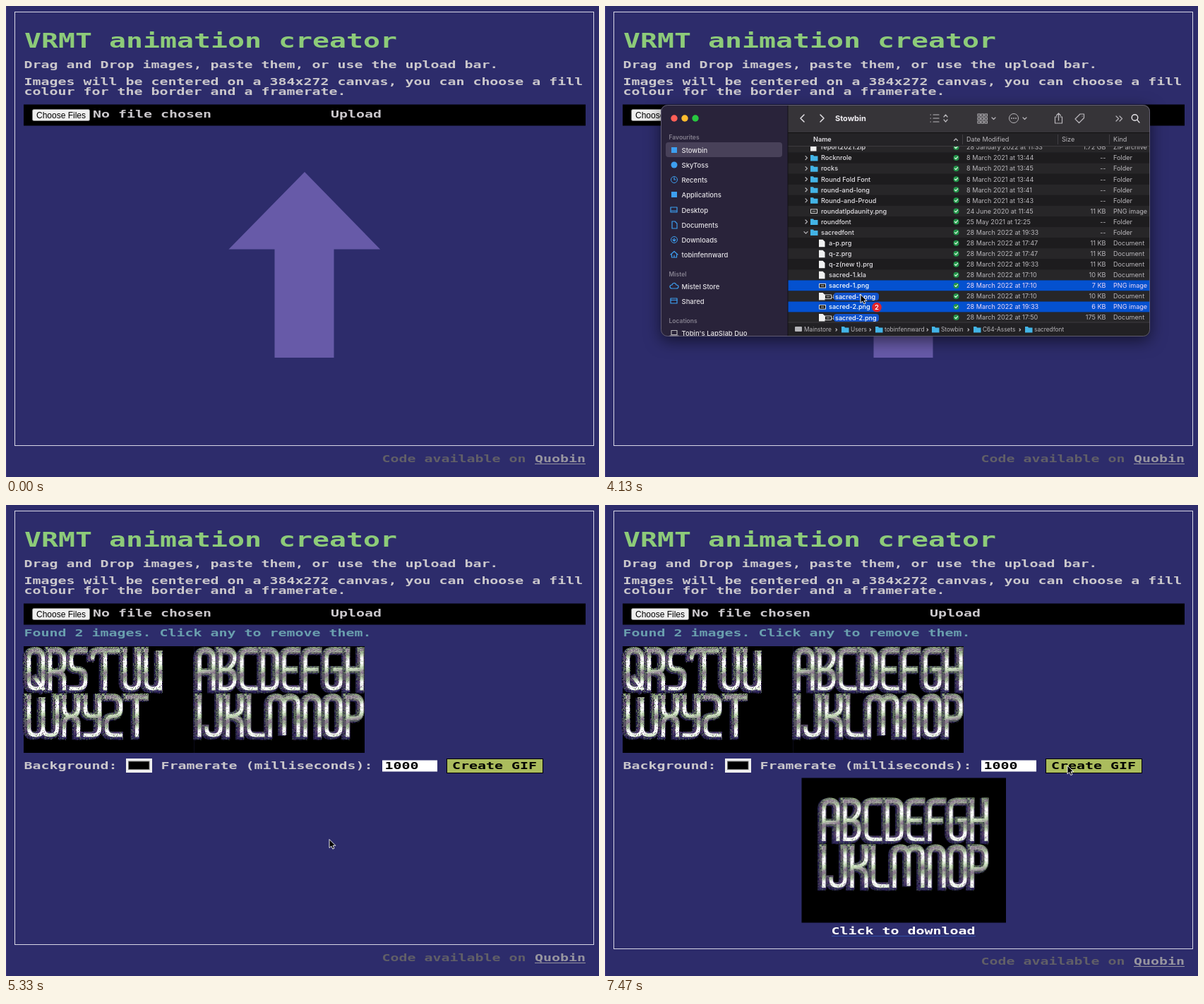
An HTML page for the animation above (8 s loop, 840x667 px).

```html
<!DOCTYPE html>
<html lang="en">
<head>
<meta charset="utf-8">
<title>Animation creator</title>
<style>
html, body { margin: 0; width: 100%; height: 100%; overflow: hidden; background: #2d2c6b; }
svg { display: block; }
text { font-family: Inter, sans-serif; white-space: pre; }
.wide { font-family: "DejaVu Sans Mono", monospace; font-weight: bold; }
.button { font: 12px "Liberation Sans", sans-serif; }
.line { fill: none; stroke-width: 1.2; stroke-linecap: round; stroke-linejoin: round; }
#finder { filter: drop-shadow(0 6px 11px rgba(0,0,0,.55)); }
</style>
</head>
<body>
<svg id="stage" width="840" height="667" viewBox="0 0 840 667"></svg>
<script>
const rect = (x, y, w, h, fill, extra = '') =>
  `<rect x="${x}" y="${y}" width="${w}" height="${h}" fill="${fill}" ${extra}/>`;
const disc = (x, y, r, fill, extra = '') => `<circle cx="${x}" cy="${y}" r="${r}" fill="${fill}" ${extra}/>`;
const line = (d, stroke, extra = '') => `<path class="line" d="${d}" stroke="${stroke}" ${extra}/>`;
const text = (x, y, str, size, fill, extra = '') =>
  `<text x="${x}" y="${y}" font-size="${size}" fill="${fill}" ${extra}>${str}</text>`;

// Wide monospaced face: one cell is 12 px at size 14
const wide = (x, y, str, fill = '#cbc8cc', size = 14, extra = '') =>
  `<text class="wide" transform="translate(${x} ${y}) scale(1.424 1)" font-size="${size}" fill="${fill}" ${extra}>${str}</text>`;

let seed = 7;
const random = () => (seed = seed * 16807 % 2147483647) / 2147483647;

// ---- Ornamental alphabet ----
const arch = 'M0 54V10Q0 0 10 0T20 10V54';
const ring = 'M0 10V44Q0 54 10 54T20 44V10Q20 0 10 0T0 10';
const flag = 'M0 54V0H10Q20 0 20 10V20Q20 30 10 30H0';
const hook = 'M20 0H10Q0 0 0 10V';
const cup = 'M0 0V44Q0 54 10 54T20 44V0';
const glyphs = {
  A: arch + 'M0 30H20',
  B: 'M0 0H10Q20 0 20 10T10 27H0M10 27Q20 27 20 40T10 54H0V0',
  C: hook + '44Q0 54 10 54H20',
  D: 'M0 54V0H10Q20 0 20 10V44Q20 54 10 54H0',
  E: hook + '44Q0 54 10 54H20M0 27H16',
  F: hook + '54M0 27H16',
  G: hook + '44Q0 54 10 54T20 44V27H12',
  H: 'M0 0V54M20 0V54M0 27H20',
  I: 'M0 0V54',
  J: 'M20 0V44Q20 54 10 54T0 44',
  K: 'M0 0V54M20 0V14Q20 27 0 27Q20 27 20 40V54',
  L: 'M0 0V44Q0 54 10 54H20',
  M: arch + 'V10Q20 0 30 0T40 10V54',
  N: arch,
  O: ring,
  P: flag,
  Q: ring + 'M10 40L20 54',
  R: flag + 'M8 30Q20 30 20 42V54',
  S: hook + '17Q0 27 10 27T20 37V44Q20 54 10 54H0',
  T: 'M0 10Q0 0 10 0H36M18 0V54',
  U: cup,
  V: cup + 'V54',
  W: cup + 'V44Q20 54 30 54T40 44V0',
  X: 'M0 0V14Q0 27 10 27T20 40V54M20 0V14Q20 27 10 27T0 40V54',
  Y: 'M0 0V17Q0 27 10 27H20M20 0V44Q20 54 10 54H0',
  Z: 'M0 0H10Q20 0 20 10V17Q20 27 10 27T0 37V44Q0 54 10 54H20',
  t: 'M0 0H26M13 0V54'
};
const widths = { I: 0, M: 40, W: 40, T: 36, t: 26 };

function artRow(id, letters, y) {
  let x = 0;
  const paths = [...letters].map(c => {
    const p = `<path transform="translate(${x} 0)" d="${glyphs[c]}"/>`;
    x += (widths[c] ?? 20) + 10;
    return p;
  }).join('');
  const layer = (stroke, w, dx, dy) =>
    `<use href="#${id}" x="${dx}" y="${dy}" stroke="${stroke}" stroke-width="${w}"/>`;
  return `<g transform="translate(6 ${y + 6})" fill="none" stroke-linecap="square">
    <defs><g id="${id}">${paths}</g></defs>
    ${layer('#1e1a40', 11, -2, 1)}${layer('url(#side)', 10, 0, 0)}
    ${layer('url(#specks)', 12, -1, 1)}${layer('url(#core)', 5, 1.5, 0)}${layer('url(#dust)', 6, 1, 0)}</g>`;
}
const art = (id, top, bottom) => `<g id="${id}">${rect(0, 0, 241.5, 151, '#000')}
  ${artRow(id + 1, top, 0)}${artRow(id + 2, bottom, 66)}</g>`;

const specks = (count, colors) => Array.from({ length: count }, () =>
  rect(Math.floor(random() * 48), Math.floor(random() * 60), 1, 1, colors[Math.floor(random() * colors.length)])).join('');
const pattern = (id, content) =>
  `<pattern id="${id}" width="48" height="60" patternUnits="userSpaceOnUse">${content}</pattern>`;
const gradient = (id, x1, y1, x2, y2, colors) =>
  `<linearGradient id="${id}" gradientUnits="userSpaceOnUse" spreadMethod="repeat" x1="${x1}" y1="${y1}" x2="${x2}" y2="${y2}">${
    colors.map((c, i) => `<stop offset="${i / (colors.length - 1)}" stop-color="${c}"/>`).join('')}</linearGradient>`;

const defs = `<defs>
  ${pattern('specks', specks(1100, ['#0c0a1c', '#2f2963', '#5c4468', '#5f7a55']))}
  ${pattern('dust', specks(420, ['#8fae7f', '#6b5475', '#cfd6c9']))}
  ${gradient('side', 0, -6, 0, 60, ['#93b37c', '#654a72', '#5d7857', '#564168', '#2d2660'])}
  ${gradient('core', 0, -6, 6, 27, ['#c5dcb6', '#8b7590', '#a3bd94', '#fff', '#fff', '#c5dcb6'])}
  ${art('late', 'QRSTUV', 'WXYZt')}${art('early', 'ABCDEFGH', 'IJKLMNOP')}
  <clipPath id="rows"><rect x="259" y="199" width="513" height="249"/></clipPath>
  <clipPath id="pane"><rect x="79" y="140" width="693" height="328" rx="9"/></clipPath>
</defs>`;

// ---- Page ----
const page = rect(0, 0, 840, 667, '#2d2c6b') + rect(0, 0, 1, 667, '#403880') +
  rect(12.5, 8.5, 820, 614, 'none', 'id="frame" stroke="#d8d7e6"') +
  wide(26, 59, 'VRMT animation creator', '#8dcb79', 28) +
  wide(25.5, 88, 'Drag and Drop images, paste them, or use the upload bar.') +
  wide(25.5, 112, 'Images will be centered on a 384x272 canvas, you can choose a fill') +
  wide(25.5, 126, 'colour for the border and a framerate.') +
  rect(25, 139.5, 796, 30, '#000') +
  rect(37.5, 146.5, 81, 16, '#efefef', 'rx="2" stroke="#858585"') +
  `<text class="button" x="43" y="158.5">Choose Files</text>` +
  wide(123, 158, 'No file chosen') + wide(460, 158, 'Upload') +
  `<g id="footer">${wide(532.5, 646, 'Code available on', '#615f67')}
    ${wide(749, 646, 'Quobin', '#97959f')}${rect(749, 648, 72, 1, '#97959f')}</g>`;

const arrow = '<path id="arrow" d="M423 235L530 344.500H464.500V498H380.500V344.500H315.500Z" fill="#675aa8"/>';

const results = `<g id="results">
  ${wide(25.5, 186, 'Found 2 images. Click any to remove them.', '#6a9fae')}
  <use href="#late" x="25" y="200"/><use href="#early" x="266.500" y="200"/>
  ${wide(25.5, 374, 'Background:')}
  ${rect(170, 359, 37, 20, '#efefef')}${rect(173.5, 363, 29.5, 11.5, '#000', 'stroke="#777"')}
  ${wide(219.5, 374, 'Framerate (milliseconds):')}
  ${rect(533, 361.5, 78, 16, '#fff')}${wide(536.5, 374, '1000', '#000')}
  ${rect(624.5, 359.5, 136, 20, '#abbc5d', 'stroke="#000"')}${wide(632, 374, 'Create GIF', '#000')}
</g>`;

const preview = `<g id="preview">${rect(278.5, 386.5, 289.5, 205, '#000')}
  <use id="previewLate" href="#late" x="302.500" y="413.500"/>
  <use id="previewEarly" href="#early" x="302.500" y="413.500"/>
  ${wide(320.5, 608, 'Click to download', '#fff')}${rect(321, 610, 204, 1, '#304fa8')}</g>`;

// ---- File window ----
const BLUE = '#3d9ff0', PALE = '#e4e2e6', GREY = '#b9b7bb';
const folder = (x, y) => `<path d="M${x} ${y - 4}h4l1 1.500h5.500v7h-10.500z" fill="#43b4e6"/>`;
const paper = (x, y) => `<path d="M${x} ${y - 5}h5.500l3 3v7.500h-8.500z" fill="#f1f1f1"/>`;
const picture = (x, y) => rect(x + .5, y - 2.5, 9, 5.5, '#111', 'stroke="#ddd"') + rect(x + 2.5, y - .5, 5, 1.5, '#999');
const chevron = (x, y, r = 2.5) => line(`M${x} ${y - r}l${r} ${r}l${-r} ${r}`, GREY);

// depth | name | date | size | kind
const M21 = '8 March 2021 at 13:', M22 = '28 March 2022 at 1';
const files = [
  '0|report2021.zip|28 January 2022 at 11:33|1.72 GB|ZIP archive',
  `0|Rocknrole|${M21}44`, `0|rocks|${M21}45`, `0|Round Fold Font|${M21}44`,
  `0|round-and-long|${M21}41`, `0|Round-and-Proud|${M21}43`,
  '0|roundatlpdaunity.png|24 June 2020 at 11:45|11 KB|PNG image',
  '0|roundfont|25 May 2021 at 12:25', `0|sacredfont|${M22}9:33`,
  `1|a-p.prg|${M22}7:47|11 KB`, `1|q-z.prg|${M22}7:47|11 KB`, `1|q-z(new t).prg|${M22}9:33|11 KB`,
  `1|sacred-1.kla|${M22}7:10|10 KB`, `1|sacred-1.png|${M22}7:10|7 KB|PNG image`,
  `1|sacred-2.kla|${M22}7:10|10 KB`, `1|sacred-2.png|${M22}9:33|6 KB|PNG image`,
  `1|sacredfont.d64|${M22}7:50|175 KB`
];

function fileRow(entry, i) {
  const [depth, name, date, size, kind = size ? 'Document' : 'Folder'] = entry.split('|');
  const y = 200 + i * 15.07, x = 291 + depth * 12, base = y + 3.3;
  const picked = /^sacred-\d\.png$/.test(name);
  const soft = picked ? '#f0d9f7' : GREY;
  const icon = !size ? folder : kind == 'PNG image' ? picture : paper;
  const twist = size ? '' : name == 'sacredfont' ? line(`M282 ${y - 1}l2.500 2.500l2.500 -2.500`, GREY) : chevron(284, y);
  return rect(259, y - 7.5, 513, 15.1, picked ? '#0451cf' : i % 2 ? '#1d1c1e' : '#272628') +
    twist + icon(x, y) +
    text(depth == 1 ? 317 : 306, base, name, 9.1, picked ? '#fff' : PALE, 'font-weight="500"') +
    disc(497.5, y, 4, '#23954a') + line(`M495.500 ${y}l1.500 1.500l2.500 -3`, '#dff5e4') +
    text(512, base, date, 9.1, soft) +
    text(709.5, base, size || '--', 9.1, soft, 'text-anchor="end"') + text(720, base, kind, 9.1, soft);
}

const USER = 'tobinfennward', STORE = 'Stowbin';
const box = y => line(`M93 ${y - 4}h9v7h-9z`, BLUE);
const sideItems = [
  [204, STORE, y => rect(94, y - 4, 8, 8, BLUE)],
  [225, 'SkyToss', y => disc(98, y, 4.5, BLUE)],
  [246, 'Recents', y => disc(98, y, 4.5, 'none', `stroke="${BLUE}"`) + line(`M98 ${y - 3}v3h2`, BLUE)],
  [267, 'Applications', y => rect(94, y - 4, 8, 8, BLUE)],
  [289, 'Desktop', y => box(y) + line(`M94 ${y + 1}h7`, BLUE)],
  [310, 'Documents', y => line(`M95 ${y - 5}h4l3 3v7h-7z`, BLUE)],
  [331, 'Downloads', y => disc(98, y, 4.5, 'none', `stroke="${BLUE}"`) + line(`M98 ${y - 2}v4m-2 -2l2 2l2 -2`, BLUE)],
  [352, USER, y => line(`M93 ${y}l5 -4.500l5 4.500M94.500 ${y}v4h7v-4M98 ${y + 4}v-3`, BLUE)],
  [397, 'Mistel Store', y => line(`M95 ${y + 3}h6q3 0 3 -2.500t-3 -2.500q-1 -3 -3.500 -2.500t-2.500 2.500q-3 0 -3 2.500t3 2.500z`, BLUE)],
  [418, 'Shared', y => box(y) + line(`M93 ${y - 1.5}h9`, BLUE)],
  [463, 'Tobin\'s LapSlab Duo', y => line(`M94 ${y - 3.5}h8v6h-8zM92 ${y + 4}h12`, GREY)]
];
const sidebar = rect(79, 140, 180, 328, '#29233a') + rect(86, 193, 165, 21, '#484159', 'rx="4"') +
  ['#fe5f57', '#febc2e', '#28c840'].map((c, i) => disc(98 + 15 * i, 159, 4.7, c)).join('') +
  [[186, 'Favourites'], [380, 'Mistel'], [446, 'Locations']].map(([y, s]) =>
    text(90.5, y + 3, s, 8.5, '#85808f', 'font-weight="600"')).join('') +
  sideItems.map(([y, s, icon]) => icon(y) + text(108.5, y + 3.5, s, 9.5, PALE, 'font-weight="500"')).join('');

const grid = [0, 5, 10].map(dx => [0, 5, 10].map(dy =>
  rect(528 + dx, 153 + dy, 3.4, 3, 'none', `stroke="${GREY}"`)).join('')).join('');
const toolbar = rect(259, 140, 513, 39, '#363438') +
  line('M282 154l-5 5l5 5M305 154l5 5l-5 5', PALE, 'style="stroke-width:1.500"') +
  text(326, 163, STORE, 11, '#f1eff3', 'font-weight="700"') +
  line('M461 154h.5M461 159h.5M461 164h.5M465 154h8M465 159h8M465 164h8M480 157l2.500 -3l2.500 3M480 161l2.500 3l2.500 -3', GREY) +
  grid + line('M548 158l2.500 2.500l2.500 -2.500M592 158l2.500 2.500l2.500 -2.500', GREY) +
  disc(579, 159, 6.5, 'none', `stroke="${GREY}"`) + [-3, 0, 3].map(d => disc(579 + d, 159, .9, GREY)).join('') +
  line('M640 157h-2.500v9h10v-9h-2.500M642.500 162v-10m-3 3l3 -3l3 3', GREY) +
  line('M666 160l7 -7h5.500v5.500l-7 7zM676 156h.2', GREY) +
  line('M724 156l3.500 3.500l-3.500 3.500M729 156l3.500 3.500l-3.500 3.500', GREY) +
  disc(750.5, 158, 4.3, 'none', `stroke="${PALE}" stroke-width="1.400"`) + line('M753.500 161l3.500 4', PALE);

const header = rect(259, 179, 513, 20, '#242326') + rect(259, 179, 513, 1, '#111') + rect(259, 198, 513, 1, '#3d3b3f') +
  [506, 641, 714].map(x => rect(x, 182, 1, 14, '#403e43')).join('') +
  text(295, 192.3, 'Name', 9.1, PALE, 'font-weight="600"') + line('M494.500 190.500l2.500 -2.500l2.500 2.500', GREY) +
  [[512, 'Date Modified'], [647, 'Size'], [720, 'Kind']].map(([x, s]) => text(x, 192.3, s, 9.1, GREY)).join('');

const crumbs = [[282, 'Mainstore', 327], [348, 'Users', 375], [396, USER, 456], [476, STORE, 514], [535, 'C64-Assets', 587], [608, 'sacredfont']];
const pathBar = rect(259, 448, 513, 20, '#222124') + rect(259, 447.5, 513, 1, '#3d3b3f') +
  crumbs.map(([x, s, next], i) => (i ? folder(x - 13, 458) : rect(269, 454, 10, 7, '#b5b5b9', 'rx="1"')) +
    text(x, 461, s, 8.3, GREY) + (next ? chevron(next, 458.5, 1.6) : '')).join('');

const finder = `<g id="finder"><g clip-path="url(#pane)">${sidebar}${rect(259, 199, 513, 249, '#1d1c1e')}
  <g clip-path="url(#rows)">${files.map(fileRow).join('')}</g>${toolbar}${header}${pathBar}
  ${rect(258.5, 140, 1, 328, '#141218')}</g>
  ${rect(79.5, 140.5, 692, 327, 'none', 'rx="9" stroke="#77738a" stroke-opacity=".7"')}</g>`;

// ---- Pointer, with its tip at the origin ----
const dragged = [1, 2].map((n, i) => {
  const y = 3 + 30 * i;
  return picture(-51, y) + rect(-38, y - 5.5, 64, 11, '#1253cc', 'rx="4"') +
    text(-36, y + 3.3, `sacred-${n}.png`, 9.1, '#fff', 'font-weight="500"');
}).join('');
const pointer = `<g id="pointer">
  <g id="drag">${dragged}
    <g id="plus">${disc(7, 18, 6.5, '#28a33a')}${line('M3.500 18h7M7 14.500v7', '#fff', 'style="stroke-width:2"')}</g>
    ${disc(23, 18, 6.8, '#e0242b')}${text(23, 21.5, '2', 9.5, '#fff', 'text-anchor="middle" font-weight="600"')}</g>
  <path id="tip" d="M0 0V12L2.800 9.500L4.800 13.600L7 12.600L5 8.800H8.800Z" fill="#000" stroke="#fff" stroke-width=".9"/>
  <path id="hand" d="M2 1Q4 0 4.500 2L5.500 5L9 5.500Q11 6.500 10.500 9L9.500 13H4L0 8.500Q0 7 2 8L3 8.500Z"
    fill="#fff" stroke="#111" stroke-width=".9"/>
</g>`;

document.getElementById('stage').innerHTML =
  defs + page + arrow + results + preview + finder + pointer;

// ---- Motion: tick, x, y at 15 ticks per second ----
const route = [
  [7, 118, 6], [9, 438, 248], [13, 438, 248], [14, 455, 250], [16, 664, 269], [45, 664, 269],
  [49, 750, 330], [58, 353, 393], [61, 353, 393], [68, 416, 502], [79, 416, 502],
  [81, 500, 445], [84, 500, 445], [87, 654, 380], [89, 654, 380], [92, 655, 369], [120, 655, 369]
];
function pointAt(tick) {
  const i = Math.max(1, route.findIndex(k => k[0] >= tick));
  const [t0, x0, y0] = route[i - 1], [t1, x1, y1] = route[i];
  const p = Math.max(0, (tick - t0) / (t1 - t0));
  return [x0 + (x1 - x0) * p, y0 + (y1 - y0) * p];
}

const el = id => document.getElementById(id);
const show = (id, on) => el(id).style.display = on ? '' : 'none';

function draw(now) {
  const tick = Math.floor((now % 8000 + 4) * 15 / 1000);
  const [x, y] = pointAt(tick);
  const loaded = tick >= 69, made = tick >= 98, hand = tick >= 21 && tick < 46;
  show('arrow', !loaded);
  show('finder', tick >= 44 && !loaded);
  show('results', loaded);
  show('preview', made);
  show('previewLate', tick < 112);
  show('previewEarly', tick >= 112);
  show('pointer', tick >= 7);
  show('drag', tick >= 62 && !loaded);
  show('plus', y > 468);
  show('tip', !hand);
  show('hand', hand);
  el('pointer').setAttribute('transform', `translate(${x} ${y})`);
  el('frame').setAttribute('height', made ? 620 : 614);
  el('footer').setAttribute('transform', `translate(0 ${made ? 5 : 0})`);
  requestAnimationFrame(draw);
}
requestAnimationFrame(draw);
</script>
</body>
</html>
```
